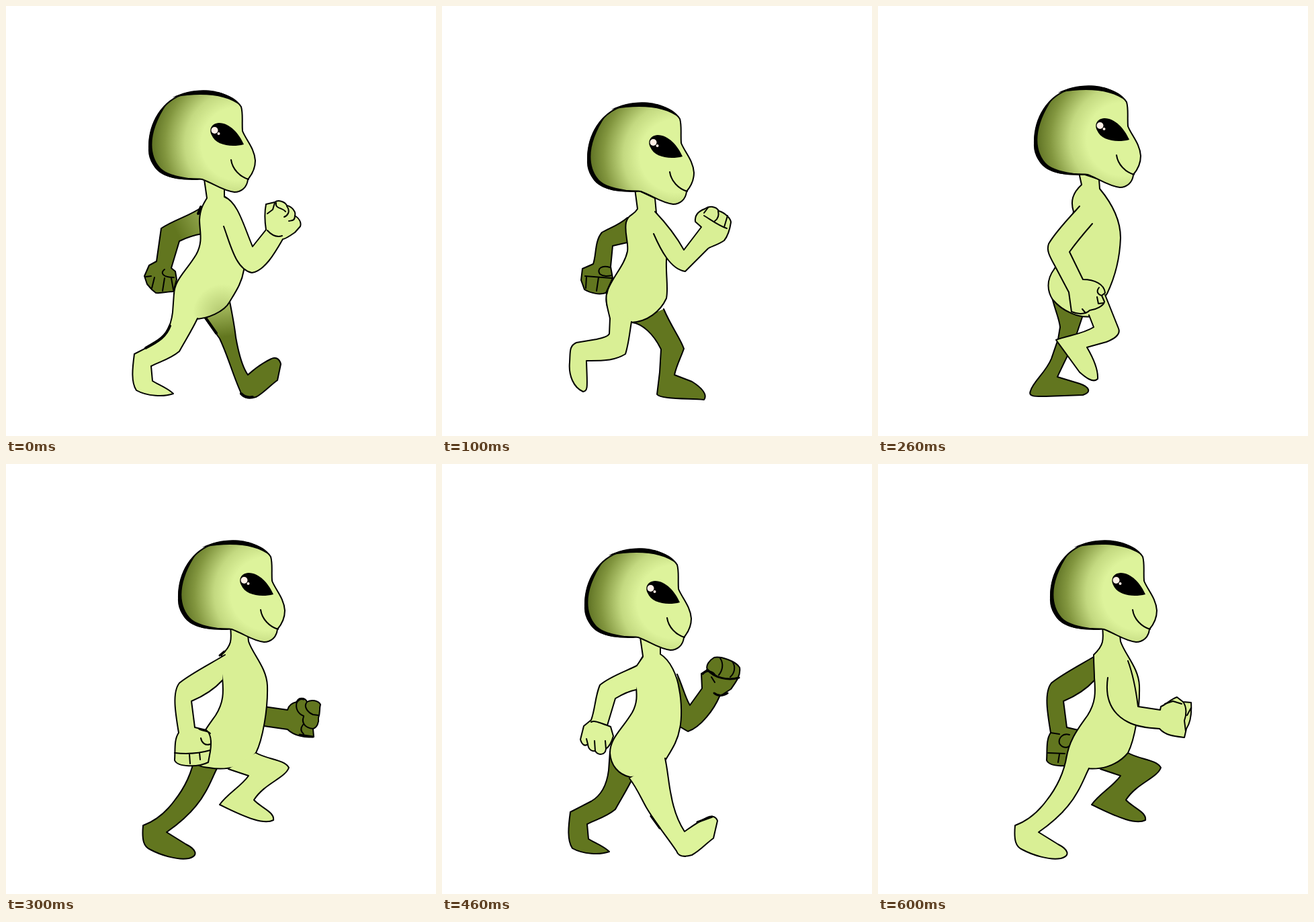
An HTML page for the animation above (0.7 s loop, 640 by 640 pixels).

```html
<!DOCTYPE html>
<html lang="en">
<head>
<meta charset="utf-8">
<title>Walking alien</title>
<style>
html, body { margin: 0; width: 100%; height: 100%; overflow: hidden; background: #fff; }
.strip { display: block; width: 4480px; height: 640px; animation: walk 700ms steps(7) infinite; }
@keyframes walk { to { transform: translateX(-4480px); } }
path { stroke: #000; stroke-width: 2; stroke-linejoin: round; stroke-linecap: round; }
.light { fill: #d9ef95; }
.pale { fill: #ddf39b; }
.dark { fill: #62761f; }
.line { fill: none; }
.firm { fill: none; stroke-width: 3; }
.bold { fill: none; stroke-width: 4; }
.ink { fill: #000; stroke: none; }
.glint { fill: #fff0e6; }
</style>
</head>
<body>
<svg class="strip" viewBox="0 0 4480 640">
<defs>
  <radialGradient id="skull" gradientUnits="userSpaceOnUse" cx="345" cy="205" r="136">
    <stop offset=".4" stop-color="#ddf39b"/>
    <stop offset=".58" stop-color="#c3d980"/>
    <stop offset=".8" stop-color="#82963f"/>
    <stop offset="1" stop-color="#52651a"/>
  </radialGradient>
  <linearGradient id="armFade" gradientUnits="userSpaceOnUse" x1="245" y1="345" x2="298" y2="318">
    <stop offset=".2" stop-color="#62761f"/>
    <stop offset="1" stop-color="#94a950"/>
  </linearGradient>
  <linearGradient id="legFade" gradientUnits="userSpaceOnUse" x1="322" y1="448" x2="328" y2="492">
    <stop offset="0" stop-color="#a3b85c"/>
    <stop offset="1" stop-color="#62761f"/>
  </linearGradient>
  <radialGradient id="bellyFade" gradientUnits="userSpaceOnUse" cx="322" cy="458" r="44">
    <stop offset="0" stop-color="#b1c66e"/>
    <stop offset="1" stop-color="#ddf39b"/>
  </radialGradient>

  <g id="head">
    <path fill="url(#skull)" d="M213 212C212 175 232 140 268 130C300 122 337 130 350 150C353 160 351 172 352 186C357 199 370 212 371 230C371 243 366 251 360 258C359 270 350 277 340 277C322 275 309 264 292 258C272 256 256 259 240 252C221 244 212 228 213 212Z"/>
    <path class="ink" d="M240 145C213 168 204 214 221 240C231 254 252 260 292 259C254 254 238 250 229 240C212 220 212 186 240 145ZM248 136C280 120 326 120 350 149C328 132 294 128 248 136Z"/>
    <path class="ink" d="M354 206C347 190 333 174 317 174C305 175 302 184 306 192C312 207 335 211 354 206Z"/>
    <circle class="glint" cx="310.500" cy="185" r="5"/>
    <circle class="glint" cx="316.500" cy="190" r="2"/>
    <path class="line" d="M335 229C337 243 348 254 361 258"/>
  </g>

  <!-- long stride -->
  <path id="torsoA" d="M325 283L325 270L295 258L299 286C294 294 289 302 288 318C288 335 294 350 283 370C268 395 250 408 250 430C251 448 262 462 280 466C300 466 325 455 333 440C342 425 351 412 354 393C357 380 357 355 353 335C350 315 340 292 325 283Z"/>
  <path id="rearA" d="M250 428L248 456C245 480 236 494 222 502L191 518C188 540 186 560 194 572C210 581 235 582 249 577C240 568 225 563 218 558L216 536C230 529 245 525 258 514C268 496 277 482 285 465"/>

  <!-- low step -->
  <path id="torsoB" d="M319 308L317 286L287 272L291 302C285 312 277 310 274 322C271 338 278 352 276 365C272 385 255 402 247 422C239 447 251 470 282 471C305 470 325 455 334 435C337 420 333 400 334 378C337 355 330 330 319 308Z"/>
  <path id="rearB" d="M245 428C243 440 247 452 250 465L249 488C247 492 240 494 230 496L200 501C189 506 191 515 190 530C188 550 196 568 210 574C218 573 216 565 215 528C235 528 255 529 273 518C278 502 279 488 282 470"/>
  <path id="foreB" d="M283 471C298 473 315 488 326 511L324 545L320 578C325 585 360 584 390 586C396 578 385 567 372 559L346 549C349 535 356 522 360 510C355 495 341 477 330 451"/>

  <!-- push off -->
  <path id="torsoD" d="M361 264L360 254L334 242C336 262 336 270 321 284C321 300 322 308 322 318C324 340 324 355 312 374C300 391 284 410 280 440C284 450 292 451 302 452C330 457 355 450 372 430C382 410 390 365 389 330C388 303 367 283 361 264Z"/>
  <path id="rearD" d="M281 434C276 465 262 487 250 502C235 522 220 532 204 538C202 560 205 570 215 574C230 582 255 590 272 587C288 583 282 573 268 566L239 548C265 530 285 510 297 488C304 476 308 465 314 453"/>
  <path id="foreD" d="M372 430C390 440 415 440 421 452C415 468 385 475 369 500C380 512 400 518 398 530C385 537 360 528 318 507C330 490 350 480 361 464L331 454"/>
  <path id="armD" d="M326 284C305 297 275 312 258 326C247 340 252 370 257 400C250 410 252 425 251 441C255 451 285 452 301 444L304 428C306 415 306 402 298 396L281 392L276 353C295 345 312 333 322 322"/>
</defs>

<g>
  <path fill="url(#armFade)" d="M292 299C275 312 250 318 231 331L224 380L213 386L206 402L210 414L217 422L223 427C232 428 240 425 249 425L254 407L252 395L246 390L258 350C270 344 280 341 292 339"/>
  <path class="line" d="M208 403L216 402M221 404L217 420M236 405L233 424M246 405L249 422M236 392C229 397 233 404 250 404"/>
  <path fill="url(#legFade)" d="M295 463L318 495C330 520 338 550 349 574C350 584 362 585 372 582C385 575 395 563 404 557L409 533C407 524 400 522 395 525C380 532 370 540 360 549C350 535 345 510 342 493C340 475 336 455 333 440"/>
  <path class="bold" d="M297 464L313 487M350 577Q357 584 367 582"/>
  <use href="#torsoA" fill="url(#bellyFade)"/>
  <use href="#rearA" class="pale"/>
  <path class="bold" d="M244 476C238 492 228 498 208 509M290 299L286 309"/>
  <path class="pale" d="M325 284C345 292 353 325 367 358L387 333C385 320 385 305 387 295L400 292C405 288 415 291 418 297C425 298 432 306 430 312C436 316 440 322 438 328L430 337C420 344 414 347 412 347C400 368 385 394 366 397C342 392 334 355 324 328"/>
  <path class="line" d="M400 293L397 303L389 309M402 293C400 302 412 300 416 306M418 298C424 306 419 312 414 314M430 312C430 320 426 319 421 320M389 334C398 344 405 344 411 342"/>
  <use href="#head"/>
</g>

<g transform="translate(640)">
  <path class="dark" d="M276 315C262 327 250 330 238 337C227 350 230 370 225 384L209 391L207 408L212 422C222 428 235 430 244 427L254 405L251 388L254 357L276 352"/>
  <path class="line" d="M213 402L253 405M215 403L214 420M233 404L230 424M250 389C238 385 230 391 235 399C240 403 246 402 253 401"/>
  <use href="#foreB" class="dark"/>
  <use href="#torsoB" class="light"/>
  <use href="#rearB" class="light"/>
  <path class="light" d="M317 306C335 325 350 345 360 363L386 329L377 321C376 312 380 306 391 302C398 297 408 298 412 305C422 308 430 317 430 322C428 335 425 343 420 349C410 356 400 358 396 361L362 395C340 392 325 362 315 339"/>
  <path class="line" d="M396 300L390 308M411 305C413 314 409 318 406 320M425 312L420 329M390 312C400 318 412 327 424 331"/>
  <use href="#head" transform="translate(4 18)"/>
</g>

<g transform="translate(1280)">
  <path class="dark" d="M257 425C262 450 270 465 271 478L268 496L258 525C250 545 230 560 227 573C223 582 235 581 250 581L305 579C318 575 315 567 300 562L267 552C275 535 282 520 290 505L305 460"/>
  <path class="light" d="M330 272L329 258L299 248L303 266C290 278 286 290 291 306L275 370L262 392C250 408 252 425 260 437C275 455 300 465 318 462L341 428C352 405 360 375 361 345C361 315 345 290 330 272Z"/>
  <path class="light" d="M338 430L358 480C362 490 350 496 340 500L311 508C318 520 328 540 327 555C320 562 308 552 300 545L265 497C285 490 305 488 321 478L314 460"/>
  <path class="light" d="M300 298C285 315 265 335 254 354C250 365 257 375 265 390L284 426L288 455C300 460 310 458 315 453C325 452 336 446 337 440L333 431L338 427C337 414 322 407 305 407L285 366C295 352 305 340 319 324"/>
  <path class="line" d="M329 419C325 424 326 429 333 431M326 433L328 443L336 442M304 451L309 457"/>
  <use href="#head" transform="translate(20 -7)"/>
</g>

<g transform="translate(1920)">
  <path class="dark" d="M384 361L419 366C421 358 428 355 433 354C435 347 445 347 448 354C455 350 465 352 468 358C466 365 468 370 465 378C466 385 463 392 457 394L458 406C445 408 428 404 419 395L384 390"/>
  <path class="line" d="M433 354C430 364 435 372 443 375M448 354C442 362 450 370 457 373L465 374M443 376C439 386 446 393 457 394M442 388Q436 396 443 402"/>
  <path class="firm" d="M433 354Q437 348 443 350M437 403L457 406"/>
  <use href="#rearD" class="dark"/>
  <use href="#torsoD" class="light"/>
  <use href="#foreD" class="light"/>
  <use href="#armD" class="light"/>
  <path class="line" d="M251 430C270 432 290 430 304 426M273 432L274 446M288 430L289 440M287 394C291 398 300 396 304 401M304 417C296 420 291 414 290 408"/>
  <path class="firm" d="M318 285L325 279"/>
  <use href="#head" transform="translate(44 -12)"/>
</g>

<g transform="translate(2560)">
  <path class="dark" d="M350 313C358 330 362 348 369 359L387 334L386 312L395 306C392 300 398 292 405 288C415 286 437 293 443 303C445 315 437 325 430 335L413 346C405 365 385 392 366 398L354 391"/>
  <path class="line" d="M388 313C396 305 404 309 407 315M414 289C420 298 417 308 412 314M432 294C438 302 435 312 429 317M401 317L406 325"/>
  <path class="firm" d="M395 306C405 318 425 323 442 318M405 341Q414 348 425 341"/>
  <use href="#rearA" class="dark"/>
  <use href="#torsoA" class="pale"/>
  <path class="pale" d="M279 468C290 482 297 499 304 511C318 535 335 555 349 576C352 585 362 585 372 582C385 575 395 563 404 557L410 531C407 523 400 524 395 526C380 533 371 540 361 547C350 530 344 510 341 493C337 475 336 455 332 438"/>
  <path class="firm" d="M311 524L324 542M380 533L402 525"/>
  <path class="pale" d="M299 287L290 300C275 308 250 316 235 329C228 345 228 365 222 381L211 390L206 410C208 417 212 421 217 417C218 426 224 428 228 427C232 434 243 434 244 424C250 420 253 412 255 405L251 391L246 389L258 349C268 343 278 338 289 336"/>
  <path class="line" d="M222 384C228 381 236 386 246 389M217 417L215 409M228 427L227 412M244 424L243 412"/>
  <use href="#head"/>
</g>

<g transform="translate(3200)">
  <path class="dark" d="M318 307C340 328 350 345 361 361L384 334L378 320C378 310 385 306 391 303C397 295 409 296 411 304C421 306 430 314 432 318C430 335 425 345 415 352L398 357C388 368 378 382 364 394C352 390 343 385 333 376"/>
  <path class="line" d="M380 310C388 302 400 311 397 318C392 324 385 322 381 318M391 303L398 309M411 305C415 317 407 323 401 320M422 310C424 324 416 330 410 328M431 319Q426 333 419 331"/>
  <use href="#rearB" class="dark"/>
  <use href="#torsoB" class="light"/>
  <use href="#foreB" class="light"/>
  <path class="light" d="M291 302L273 322C258 325 242 324 230 328C222 340 226 360 222 381L207 388L200 406C203 416 209 420 212 417C211 426 214 429 222 428C226 433 238 432 238 419C243 421 247 418 248 414L253 396L246 391L249 356L274 350"/>
  <path class="line" d="M212 417L210 411M222 428L222 414M238 419L240 405M241 390L253 396"/>
  <use href="#head" transform="translate(4 18)"/>
</g>

<g transform="translate(3840)">
  <use href="#armD" class="dark"/>
  <path class="line" d="M285 403C275 400 268 408 270 416C275 424 283 422 284 420M253 430L278 431M270 432L268 444M257 400L270 402"/>
  <use href="#foreD" class="dark"/>
  <use href="#torsoD" class="light"/>
  <use href="#rearD" class="light"/>
  <path class="light" d="M372 293C382 320 385 345 387 361L420 366L421 361C430 357 436 350 445 347L454 354L466 355C467 370 465 385 459 394L456 407C440 405 428 404 419 394C400 393 385 391 372 384C345 370 338 345 342 318"/>
  <path class="line" d="M427 357L439 353L452 357M454 354C460 362 459 374 456 382L458 398M466 363L460 374"/>
  <use href="#head" transform="translate(44 -12)"/>
</g>
</svg>
</body>
</html>
```
